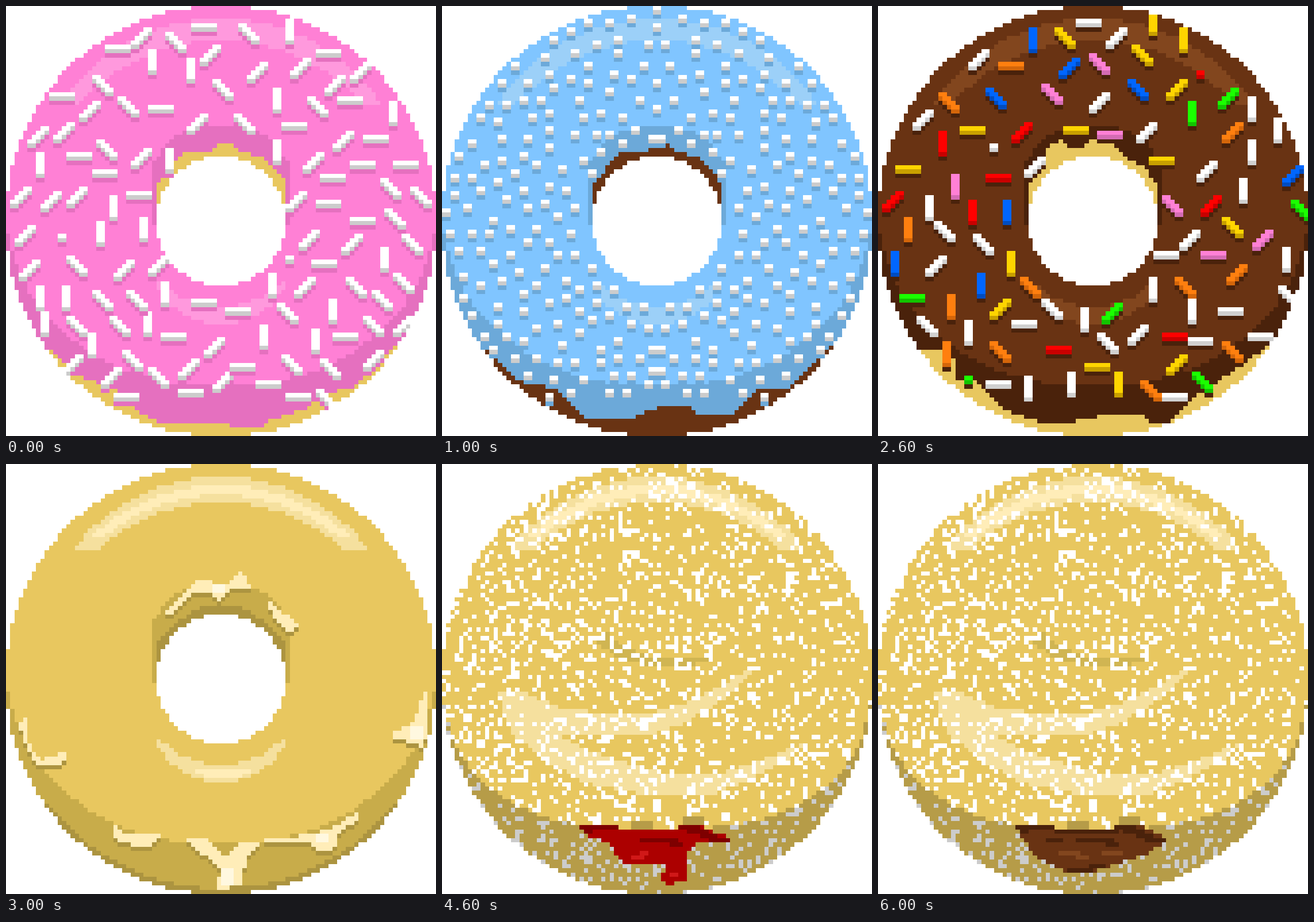
These frames come from a looping animation (748x748 px, 7 s). An HTML page with a canvas:

```html
<!DOCTYPE html>
<html lang="en">
<head>
<meta charset="utf-8">
<title>Doughnuts</title>
<style>
html, body { margin: 0; width: 100%; height: 100%; overflow: hidden; background: #fff; }
canvas { display: block; width: 100vw; height: 100vh; image-rendering: pixelated; }
</style>
</head>
<body>
<canvas id="stage" width="100" height="100"></canvas>
<script>
const N = 100, MID = 50, HOLD = 1000;
const DOUGH = '#e8c75f', BROWN = '#693313', DARK = '#4a220b', LIGHT = '#82461e';
const OLIVE = '#b69c48', OLIVE2 = '#9c7f35', PALE = '#f5e09e', CREAM = '#ffedb8';
const MILK = '#eee4ce', MILK2 = '#cdbf9b';
let g;

function random(seed) {
  return () => (seed = seed * 16807 % 2147483647) / 2147483647;
}

// Regions are tests on cell centres.
const disc = (x, y) => Math.abs(x - MID) ** 2.04 + Math.abs(y - MID) ** 2.04 <= MID ** 2.04;
const circle = (cy, r) => (x, y) => Math.hypot(x - MID, y - cy) <= r;
const hole = circle(MID, 15);
const below = (cy, b, p) => (x, y) =>
  y > cy && Math.abs((x - MID) / MID) ** p + ((y - cy) / b) ** p > 1;
const rim = (x, y) => y > 79 && ((x - MID) / MID) ** 2 + ((y - MID) / 48.7) ** 2 > 1;
const moon = (outer, inner, part) => (x, y) => part(y) && outer(x, y) && !inner(x, y);

function cell(x, y, c) {
  if (!disc(x + .5, y + .5)) return;
  g.fillStyle = c;
  g.fillRect(x, y, 1, 1);
}
function fill(c, test) {
  for (let y = 0; y < N; y++)
    for (let x = 0; x < N; x++)
      if (test(x + .5, y + .5)) cell(x, y, c);
}
function inside(p, x, y) {
  let odd = false;
  for (let i = 0, j = p.length - 2; i < p.length; j = i, i += 2) {
    const y1 = p[i + 1], y2 = p[j + 1];
    if ((y1 > y) !== (y2 > y) && x < p[i] + (y - y1) * (p[j] - p[i]) / (y2 - y1)) odd = !odd;
  }
  return odd;
}
const poly = (c, p, dy = 0) => fill(c, (x, y) => inside(p, x, y - dy));
const skirt = (c, p) => poly(c, [...p, N, N, 0, N]);
// Arch given by its left half
const arch = (c, p) => fill(c, (x, y) => inside([...p, MID, p.at(-1), MID, p[1]], x > MID ? N - x : x, y));
function bar(c, x, y, w, h = 1) {
  for (let j = 0; j < h; j++) for (let i = 0; i < w; i++) cell(x + i, y + j, c);
}

const gloss = moon(circle(48, 45), circle(51.8, 43.8), y => y < 23);
const shine = moon(circle(46.6, 43.6), circle(52.7, 43.7), y => y < 20);
const glint = moon(circle(49.2, 44.2), circle(50, 42.8), y => y < 17);
const smile = moon(circle(57, 17), circle(50.6, 19.4), y => y > 64);
const INNER = [35,46, 35,42, 38,38, 42,33, 43,34, 48,34, 49,32, 53,32, 55,34, 60,35, 63,38, 65,41, 65,46];
const SWOOSH = [13,53, 19,53, 28,57, 40,58, 48,58, 56,56, 66,51, 71,48, 73,48, 68,53, 62,57, 55,61, 48,63,
  27,63, 33,66, 48,71, 55,72.5, 66,71.5, 74,69, 84,65, 82,68, 72,73, 62,77.5, 50,77.5, 33,74, 26,70, 16,63];

function ring(base, shade, light) {
  fill(base, disc);
  fill(shade, below(46, 42.5, 2.1));
  arch(shade, [34,51, 34,37, 36,34, 40,30, 45,28]);
  if (light) { fill(light, gloss); fill(light, smile); }
}

// Sprinkles: offset and pieces [dx, dy, w, h]
const steps = dir => [0, 1, 2, 3].map(r => [dir > 0 ? r : 3 - r, r, 2, 1]);
const KINDS = [
  { ox: 3, oy: 1, parts: [[0, 0, 6, 1]] },
  { ox: 1, oy: 3, parts: [[0, 0, 2, 5]] },
  { ox: 2, oy: 2, parts: steps(-1) },
  { ox: 2, oy: 2, parts: steps(1) }
];
const DOT = { ox: 1, oy: 1, parts: [[0, 0, 2, 1]] };

function sprinkle(kind, x, y, [top, under, cast]) {
  [cast, under, top].forEach((c, i) => {
    for (const [dx, dy, w, h] of kind.parts)
      bar(c, x - kind.ox + dx, y - kind.oy + dy + 2 - i, w, h);
  });
}
// Evenly spread random places on the icing
function spread(seed, gap, width, reach, place) {
  const rand = random(seed), spots = [];
  for (let i = 0; i < 6000; i++) {
    const x = rand() * width, y = rand() * 91, r = Math.hypot(x - MID, y - MID);
    if (r < 18 || r > reach || spots.some(([u, v]) => Math.hypot(u - x, v - y) < gap)) continue;
    spots.push([x, y]);
    place(Math.round(x), Math.round(y), rand);
  }
}
const anyKind = rand => rand() < .06 ? DOT : KINDS[Math.floor(rand() * KINDS.length)];

function pinkRing() {
  const shade = '#e570bf';
  ring('#ff80d5', shade, '#ff99dd');
  poly(DOUGH, INNER);
  skirt(DOUGH, [10,80, 17,86, 26,89, 27,92, 36,97, 49,97, 59,98.5, 60,97, 69,94, 75,90, 80,89, 91,79]);
  fill('#fff', hole);
  spread(71, 6.2, N, 48, (x, y, rand) => sprinkle(anyKind(rand), x, y, ['#fff', '#ccc', shade]));
}

function blueRing() {
  const ink = ['#fff', '#ccc', '#6ca9d9'];
  ring('#80c5ff', ink[2], '#9cd0f8');
  poly(BROWN, INNER);
  skirt(BROWN, [10,80, 18,87, 26,89, 34,96, 44,96, 51,93, 58,93, 60,95, 68,95, 74,89, 81,89, 91,79]);
  fill('#fff', hole);
  // Beads mirror each other left and right.
  spread(37, 3.85, MID, 49, (x, y) => {
    sprinkle(DOT, x, y, ink);
    sprinkle(DOT, N - x, y, ink);
  });
}

function chocolateRing() {
  const inks = [['#ff7f0f', '#d4660a'], ['#ff0000', '#c80000'], ['#ffd500', '#c8a000'],
    ['#0066ff', '#004cc0'], ['#1aff00', '#12c400'], ['#ff80d5', '#d46cb4']];
  ring(BROWN, DARK, LIGHT);
  poly(DOUGH, [35,46, 35,42, 38,39, 39,33, 43,31, 45,33, 48,33, 50,31, 54,31, 58,36, 62,37, 65,42, 65,46]);
  skirt(DOUGH, [9,80, 14,80, 18,82, 18,87, 23,87, 30,94, 40,97.5, 54,95, 62,95, 64,97, 68,97, 75,90, 84,84, 91,79]);
  fill('#fff', hole);
  spread(53, 6.6, N, 48, (x, y, rand) => {
    const kind = anyKind(rand);
    const ink = rand() < .31 ? ['#fff', '#d0d0d0'] : inks[Math.floor(rand() * inks.length)];
    sprinkle(kind, x, y, [...ink, DARK]);
  });
}

function topShine() {
  fill(PALE, shine);
  fill(CREAM, (x, y) => glint(x, y) && shine(x, y));
}

function glazedRing() {
  const deep = '#ac9440', white = '#fff8e0';
  ring(DOUGH, '#c8ac4a');
  fill(deep, rim);
  arch(deep, [35,46, 35,42, 39,37, 46,33]);
  topShine();
  fill(PALE, smile);
  bar(CREAM, 44, 71, 13);
  bar(CREAM, 46, 72, 9);
  const drip = p => { poly(deep, p, 1); poly(CREAM, p); };
  drip([45,27, 52,28, 55,25, 57,29, 53,29, 50,32, 47,30, 44,30, 39,35, 37,35, 41,30]);
  drip([61,31, 65,35, 69,38, 66,39, 62,36]);
  drip([3,60, 5,59, 5,64, 8,69, 13,67, 15,68, 13,70, 7,70, 4,64]);
  drip([97,53, 98,53, 98,63, 97,66, 89,63, 95,60]);
  drip([25,83, 28,86, 37,86, 33,89, 30,89, 25,87]);
  drip([41,87, 46,87, 51,91, 55,88, 66,87, 75,85, 82,81, 82,83, 78,85, 76,90, 72,90, 71,88, 60,88, 56,91,
    55,98, 49,99, 50,94, 46,91]);
  bar(white, 48, 28, 3, 2);
  bar(white, 94, 61, 3, 3);
  bar(white, 72, 86, 3, 2);
  bar(white, 50, 94, 3, 4);
  fill('#fff', hole);
}

function sugarBun() {
  const side = below(46, 39, 2.6), rand = random(20);
  fill(DOUGH, disc);
  topShine();
  poly('#d0b552', [35,41, 38,39, 43,43, 50,45, 62,45, 62,46, 57,47, 48,47, 41,45]);
  poly(PALE, SWOOSH);
  fill(OLIVE, side);
  for (let y = 0; y < N; y++)
    for (let x = 0; x < N; x++) {
      const low = side(x + .5, y + .5);
      if (rand() < (low ? .2 : .24 - x * .0007)) cell(x, y, low ? '#ccc' : '#fff');
    }
  bar(OLIVE, 44, 83, 5, 2);
  bar(OLIVE, 56, 82, 5, 2);
}

// Dark upper edge of the opening
function lip(c) {
  bar(c, 32, 84, 9);
  bar(c, 33, 85, 2);
  bar(c, 55, 84, 5);
  bar(c, 57, 85, 5);
  bar(c, 60, 86, 4);
  bar(c, 62, 87, 5);
  bar(c, 46, 87, 9);
  bar(c, 53, 88, 3);
}

function jamBun() {
  const lit = '#d01818';
  sugarBun();
  poly('#ac0000', [32,84, 41,84, 41,85, 55,85, 60,84, 67,87, 67,88, 60,88, 57,91, 57,97, 52,98, 51,95, 53,94,
    52,93, 42,93, 39,88, 35,87]);
  lip('#7e0000');
  bar(lit, 46, 90, 2);
  bar(lit, 44, 91, 3);
  bar(lit, 53, 95, 2);
}

function chocolateBun() {
  sugarBun();
  poly(BROWN, [32,84, 41,84, 41,85, 55,85, 61,84, 67,87, 67,88, 62,91, 50,95, 44,95, 38,92, 35,89]);
  lip(DARK);
  bar(DARK, 41, 85, 15);
  bar(DARK, 39, 87, 4);
  bar(DARK, 44, 94, 6);
  bar(DARK, 49, 93, 4);
  bar(LIGHT, 42, 90, 5);
  bar(LIGHT, 46, 91, 3);
  bar(LIGHT, 52, 90, 5);
}

function creamBun() {
  const icing = [0,0, N,0, N,57, 96,66, 88,76, 79,83, 75,85, 66,85, 63,83, 57,82, 55,83, 40,83, 26,80, 17,76,
    14,70, 9,67, 5,66, 2,61, 1,45, 0,45];
  const filling = [32,84, 41,84, 41,85, 56,85, 62,84, 63,90, 60,92, 49,95, 38,93, 34,89];
  const drop = [53,20, 55,20, 57,26, 61,30, 63,37, 63,42, 61,46, 56,49, 42,49, 36,43, 36,38, 40,33, 45,30,
    50,28, 52,26];
  const base = [36,39, 42,45, 54,45, 63,36, 63,50, 36,50];
  fill(OLIVE, disc);
  fill(OLIVE2, rim);
  poly(OLIVE2, icing, 1);
  bar(OLIVE2, 0, 45, 1, 12);
  bar(OLIVE2, 29, 85, 4, 2);
  bar(OLIVE2, 62, 84, 2, 7);
  poly(OLIVE2, filling, 1);
  poly(BROWN, icing);
  fill(LIGHT, gloss);
  poly(LIGHT, SWOOSH, -3.5);
  poly(MILK, filling);
  bar(MILK2, 38, 87, 4);
  bar(MILK2, 50, 87, 4);
  bar(MILK2, 53, 88, 6);
  bar(MILK2, 49, 92, 5);
  bar('#fff', 56, 86, 4);
  bar('#fff', 41, 90, 5, 2);
  bar('#fff', 52, 90, 3);

  poly(DARK, [33,44, 65,44, 60,49, 55,51, 42,51]);
  poly(MILK, drop);
  fill(MILK2, (x, y) => inside(drop, x, y) && inside(base, x, y));
  poly('#fff', [53,21, 54,20, 57,28, 57,30, 56,30, 53,24]);
  poly('#fff', [41,35, 46,32, 50,31, 50,33, 42,38]);
}

const scenes = [pinkRing, blueRing, chocolateRing, glazedRing, jamBun, creamBun, chocolateBun].map(draw => {
  const c = document.createElement('canvas');
  c.width = c.height = N;
  g = c.getContext('2d');
  g.fillStyle = '#fff';
  g.fillRect(0, 0, N, N);
  draw();
  return c;
});

const view = document.getElementById('stage').getContext('2d');
const start = performance.now();
let shown = -1;
function tick() {
  const i = Math.floor((performance.now() - start) / HOLD) % scenes.length;
  if (i !== shown) view.drawImage(scenes[shown = i], 0, 0);
  requestAnimationFrame(tick);
}
tick();
</script>
</body>
</html>
```
